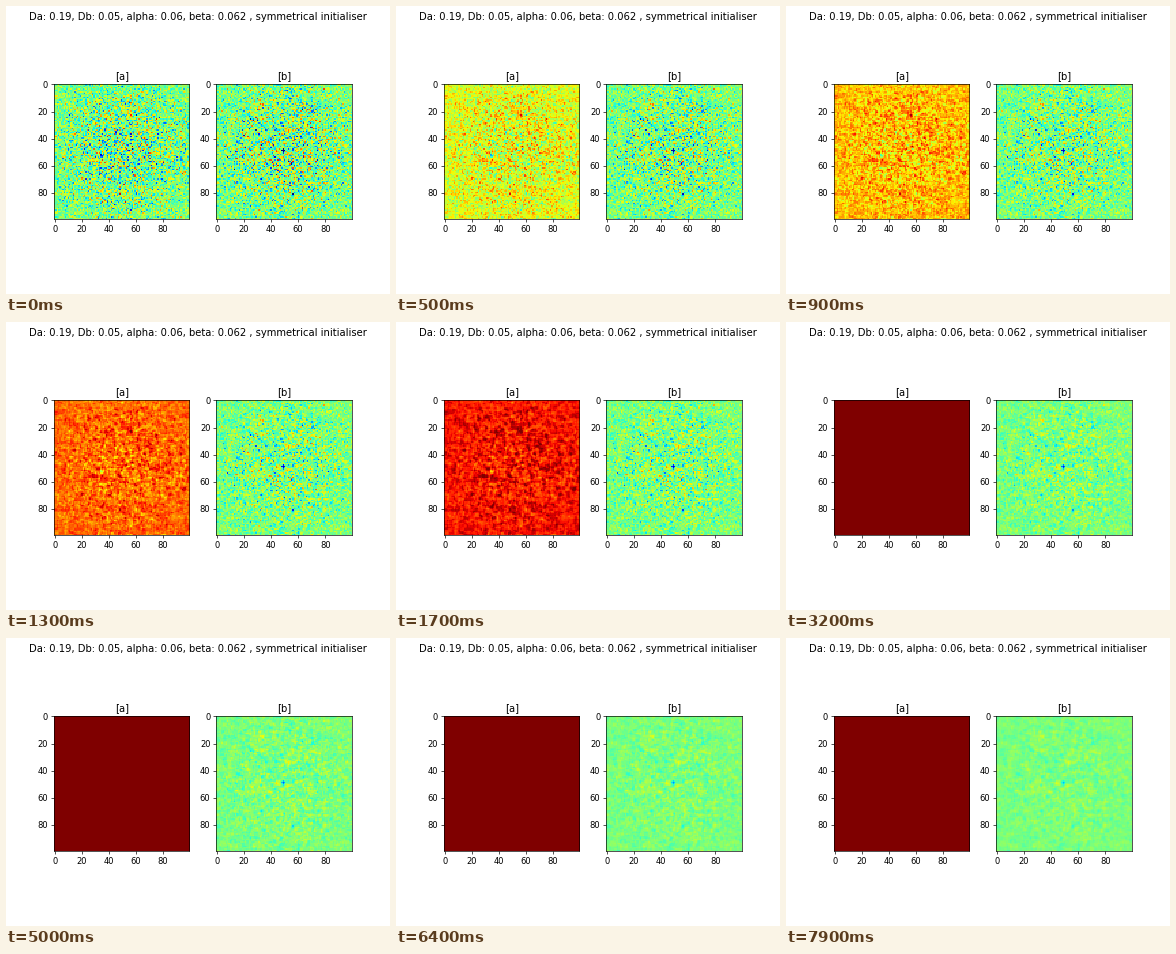
Animation, 384 px wide and 288 px high, one loop 8000 ms. Source, as a matplotlib script:

```python
import numpy as np
import matplotlib.pyplot as plt
from matplotlib.animation import FuncAnimation

DA, DB, ALPHA, BETA = 0.19, 0.05, 0.06, 0.062
SIZE, FRAMES, DT = 100, 80, 0.1
LIMIT = 0.125

rng = np.random.default_rng(7)


def laplacian(u):
    p = np.pad(u, 1, mode="edge")
    return p[:-2, 1:-1] + p[2:, 1:-1] + p[1:-1, :-2] + p[1:-1, 2:] - 4 * u


def radial_noise():
    """Gaussian noise that calms down away from the centre."""
    y, x = np.mgrid[:SIZE, :SIZE] - (SIZE - 1) / 2
    envelope = np.exp(-(x**2 + y**2) / (2 * 50**2))
    noise = rng.normal(0, 0.32 * LIMIT, (SIZE, SIZE)) * envelope
    return np.clip(noise, -LIMIT, LIMIT)


def simulate():
    a, b = radial_noise(), radial_noise()
    for x, y in [(25, 26), (63, 19), (82, 53), (56, 81), (8, 54), (13, 63)]:
        b[y, x] = -LIMIT
    b[49, 48:51] = b[48:51, 49] = -LIMIT
    states = []
    for _ in range(FRAMES):
        states.append((a, b))
        reaction = a * b**2
        da = DA * laplacian(a) - reaction + ALPHA * (1 - a)
        db = DB * laplacian(b) + reaction - BETA * b
        a, b = a + DT * da, b + DT * db
    return states


states = simulate()

fig, axes = plt.subplots(1, 2, figsize=(6.4, 4.8), dpi=60)
fig.suptitle(f"Da: {DA}, Db: {DB}, alpha: {ALPHA}, beta: {BETA} , symmetrical initialiser")

images = []
for ax, name, field in zip(axes, "ab", states[0]):
    ax.set_title(f"[{name}]")
    ax.set_xticks(range(0, SIZE, 20))
    ax.set_yticks(range(0, SIZE, 20))
    images.append(ax.imshow(field, cmap="jet", vmin=-LIMIT, vmax=LIMIT,
                            interpolation="nearest"))


def update(i):
    for image, field in zip(images, states[i]):
        image.set_data(field)
    return images


anim = FuncAnimation(fig, update, frames=FRAMES, interval=100, repeat=True,
                     repeat_delay=0, blit=False)
plt.show()
```
